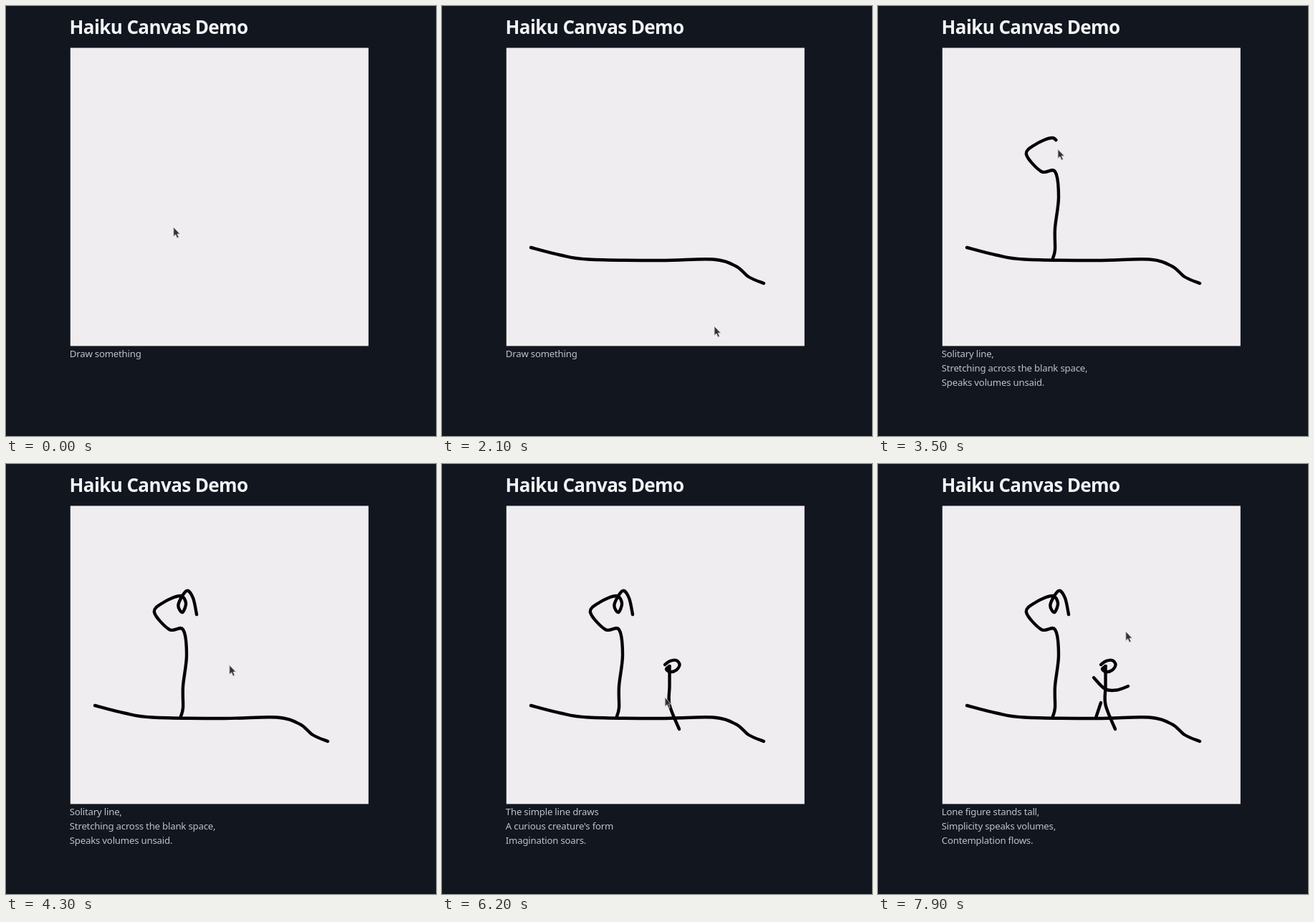
Write an HTML page that moves like this. It is 600 px wide and 600 px high and loops after 8000 ms.

```html
<!DOCTYPE html>
<html lang="en">
<head>
<meta charset="utf-8">
<title>Haiku Canvas Demo</title>
<style>
  html, body { margin: 0; width: 100%; height: 100%; overflow: hidden; background: #12161f; }
  svg { display: block; width: 100%; height: 100%; }
  text { font-family: "Noto Sans", "Open Sans", sans-serif; }
  .title { font-size: 26px; font-weight: 700; letter-spacing: -0.6px; fill: #f1f3f6; }
  .poem { font-size: 13.2px; letter-spacing: -0.2px; fill: #bec1c9; }
  .ink { fill: none; stroke: #050306; stroke-width: 4.4; stroke-linecap: round; stroke-linejoin: round; }
</style>
</head>
<body>
<svg viewBox="0 0 600 600">
  <text class="title" x="88.5" y="39">Haiku Canvas Demo</text>
  <rect x="89.800" y="58.400" width="416" height="416" fill="#efedef"/>
  <g id="drawing"></g>
  <g id="poem"></g>
  <path id="cursor" d="M0 0V12.6L2.9 10.1L5 15L7.2 14L5.1 9.3H8.8Z"
        fill="#33323a" stroke="#d2d0d5" stroke-width=".8" stroke-linejoin="round"/>
</svg>
<script>
const LOOP = 8000, STEP = 100, LAG = 30;
const SVG = "http://www.w3.org/2000/svg";

// Pen strokes and the glides between them, as a few points on a smooth curve
const gestures = [
  glide(0, 900, "233 308, 170 367, 124 337"),
  stroke(1130, 1970, "124 337, 165 347.5, 204 353.5, 305 355, 378 353.5, 410 363, 428 378, 449 387"),
  glide(1970, 2680, "449 387, 320 471, 126 410, 244 352"),
  stroke(2680, 3680, "244 352, 247 340, 247 310, 252 267, 247 231, 228 231, 207 207, 220 193, " +
    "243 184, 251 194, 246 207, 240.5 196, 252 177, 261 187, 266 210", 1.5),
  glide(3680, 4300, "266 210, 408 19, 311 280"),
  stroke(4700, 5150, "311 280, 318 275, 327 274, 331.5 280, 327 287.5, 318 290, 313 286, 317.5 282"),
  stroke(5450, 6000, "317.5 282, 317.5 310, 317.5 336, 331 370"),
  glide(6000, 6240, "331 370, 311 326, 311 333"),
  stroke(6350, 6700, "311 333, 304 354"),
  glide(6700, 7000, "304 354, 301 298"),
  stroke(7000, 7550, "301 298, 317 314, 333 315.5, 349 310"),
  glide(7550, 7900, "349 310, 345 233")
];

const poems = [
  [0, "Draw something"],
  [3200, "Solitary line,", "Stretching across the blank space,", "Speaks volumes unsaid."],
  [4900, "Slender creature waits,", "Poised with silent contemplation,", "Simplicity's grace."],
  [5900, "The simple line draws", "A curious creature's form", "Imagination soars."],
  [7600, "Lone figure stands tall,", "Simplicity speaks volumes,", "Contemplation flows."]
];

function add(parent, tag, attributes) {
  const node = document.createElementNS(SVG, tag);
  for (const name in attributes) node.setAttribute(name, attributes[name]);
  return document.getElementById(parent).appendChild(node);
}

// Catmull-Rom spline through the points, written as cubic curves
function smooth(text) {
  const pts = text.split(",").map(pair => pair.trim().split(" ").map(Number));
  const at = i => pts[Math.max(0, Math.min(pts.length - 1, i))];
  const handle = (i, side) => [0, 1].map(k => at(i)[k] + side * (at(i + 1)[k] - at(i - 1)[k]) / 6);
  return "M" + pts[0] + pts.slice(1).map((p, i) => `C${handle(i, 1)} ${handle(i + 1, -1)} ${p}`).join("");
}

function glide(start, end, points, power = 1) {
  const path = add("drawing", "path", { d: smooth(points), fill: "none" });
  return { start, end, power, path, length: path.getTotalLength() };
}

function stroke(...args) {
  const gesture = glide(...args);
  gesture.path.setAttribute("class", "ink");
  return { ...gesture, pen: true };
}

function travelled({ start, end, power, length }, t) {
  const p = Math.min(1, Math.max(0, (t - start) / (end - start)));
  return length * p ** power;
}

const lines = [490, 510, 530].map(y => add("poem", "text", { class: "poem", x: 88.8, y: y - 0.3 }));
const cursor = document.getElementById("cursor");

function draw(t) {
  for (const g of gestures.filter(g => g.pen)) {
    const ink = travelled(g, t - LAG);
    g.path.style.visibility = ink > 0 ? "visible" : "hidden";
    g.path.style.strokeDasharray = ink < g.length ? `${ink} ${g.length + 10}` : "none";
  }
  const poem = poems.filter(p => p[0] <= t).pop();
  lines.forEach((line, i) => { line.textContent = poem[i + 1] || ""; });

  const current = gestures.filter(g => g.start <= t).pop();
  const { x, y } = current.path.getPointAtLength(travelled(current, t));
  cursor.setAttribute("transform", `translate(${x + 0.8} ${y + 0.8})`);
}

const begin = performance.now();
function tick() {
  const t = (performance.now() - begin) % LOOP;
  draw(Math.floor(t / STEP) * STEP);
  requestAnimationFrame(tick);
}
tick();
</script>
</body>
</html>
```
